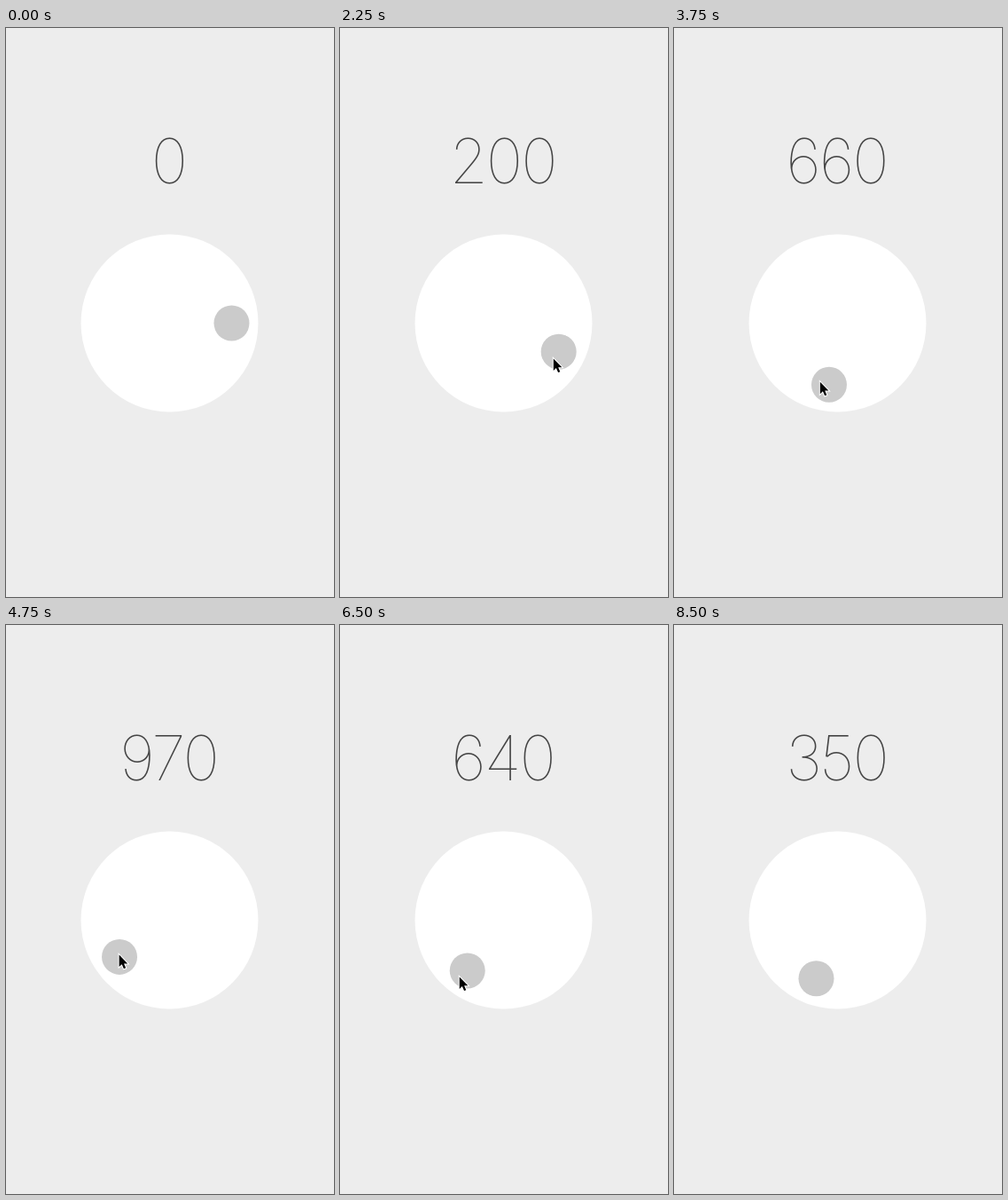
Animation, 370 px wide and 641 px high, one loop 9.75 s. Source, as an HTML page:

```html
<!DOCTYPE html>
<html lang="en">
<head>
<meta charset="utf-8">
<title>Dial</title>
<style>
  html, body { margin: 0; width: 100%; height: 100%; overflow: hidden; background: #ededed; }
  svg { display: block; width: 370px; height: 641px; }
  #value {
    font: 130 70px Inter, Roboto, sans-serif;
    font-optical-sizing: none;
    font-variation-settings: "opsz" 14;
    letter-spacing: -2px;
    text-anchor: middle;
    fill: #444;
  }
  #knob { fill: #cbcbcb; }
  #cursor { stroke: #fff; stroke-width: 2; paint-order: stroke; }
</style>
</head>
<body>
<svg viewBox="0 0 370 641">
  <text id="value" x="183.5" y="175.3">0</text>
  <circle id="dial" cx="184.5" cy="332.5" r="100" fill="#fff"/>
  <circle id="knob" r="20"/>
  <path id="cursor" d="M0 0V13.5L3.1 10.7L5.3 15.7L7.5 14.8L5.4 9.9H9.6Z"/>
</svg>
<script>
const LOOP = 9.75, STEP = 0.25;
const CENTER = { x: 184.5, y: 332.5 };
const [value, dial, knob, cursor] =
  ['value', 'dial', 'knob', 'cursor'].map(id => document.getElementById(id));

const clamp = (n, low, high) => Math.min(high, Math.max(low, n));
const mix = (a, b, p) => a + (b - a) * p;
const place = (node, { x, y }) => node.setAttribute('transform', `translate(${x} ${y})`);

function polar(degrees, radius) {
  const a = degrees * Math.PI / 180;
  return { x: CENTER.x + radius * Math.cos(a), y: CENTER.y + radius * Math.sin(a) };
}

function pose(t) {
  // Seconds spent dragging forward (with a short pause), then the share of the way back.
  const m = clamp(t - 1.75, 0, 1.5) + clamp(t - 3.5, 0, 1.25);
  const back = clamp((t - 4.75) / 3.25, 0, 1);
  const grab = t < 1.5 ? 0 : 1.6;
  return {
    amount: m * (412 - 21.5 * m) - 620 * back,
    angle: grab + m * (47.75 + 8.86 * m - 2.7 * m * m) - 33.7 * back,
    lead: Math.min(2 + 12 * m, 21 - 7 * m) + back,
    reach: 69 + 16 * Math.sin(back * Math.PI / 2)
  };
}

function draw(seconds) {
  const t = Math.floor(seconds % LOOP / STEP) * STEP;
  const { amount, angle, lead, reach } = pose(t);
  value.textContent = Math.round(amount / 10) * 10;
  place(knob, polar(angle, 70));

  const held = polar(angle + lead, reach);
  const arrival = clamp(t - 0.5, 0, 1);
  place(cursor, { x: mix(90.5, held.x, arrival), y: mix(374, held.y, arrival) });
  cursor.style.display = t >= 0.5 && t < 8.5 ? '' : 'none';
  dial.setAttribute('fill', t >= 1.5 && t < 2 ? '#fdfdfd' : '#fff');
}

const start = performance.now();
function tick() {
  draw((performance.now() - start) / 1000);
  requestAnimationFrame(tick);
}
tick();
</script>
</body>
</html>
```
